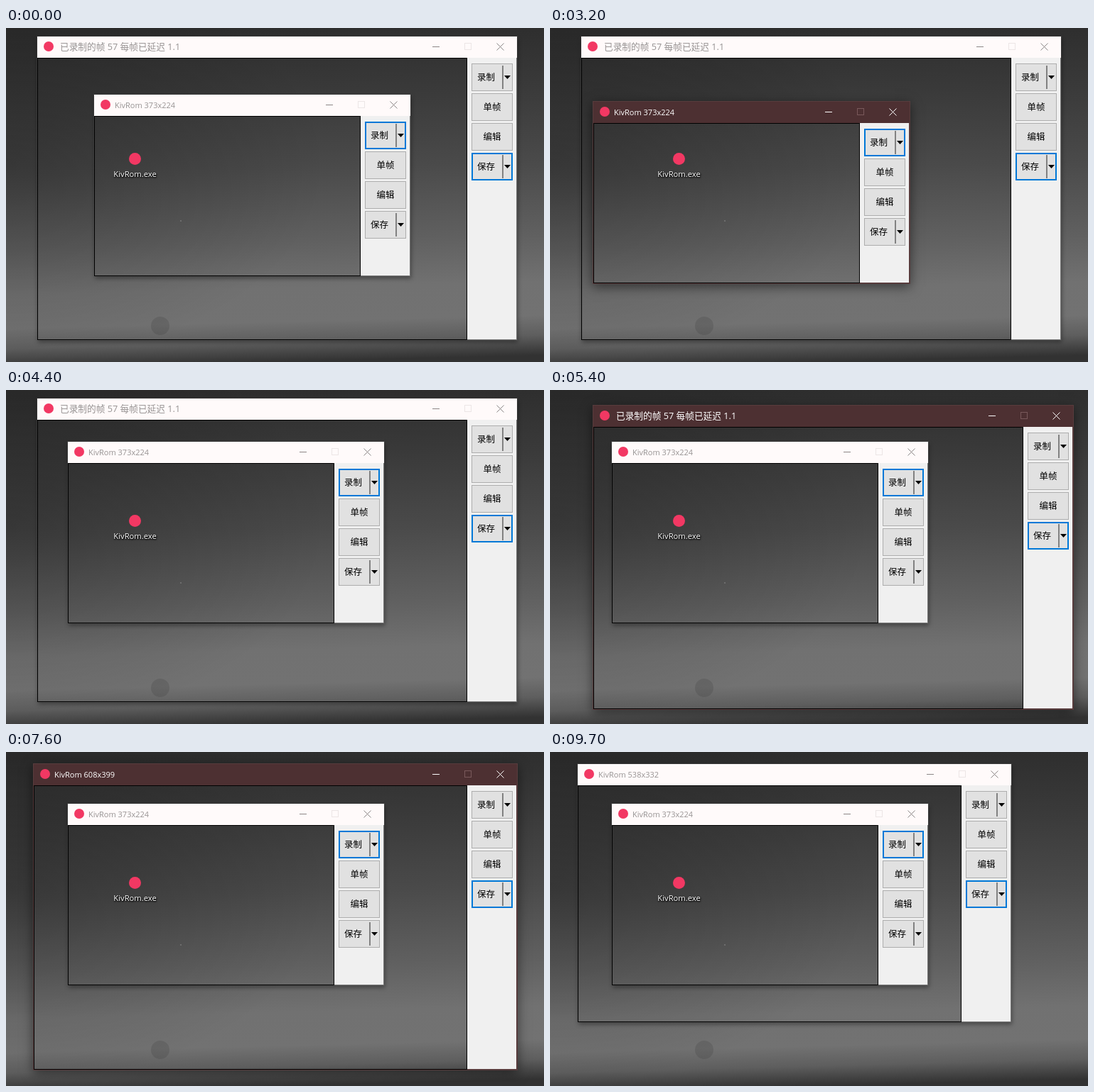
Write an HTML page that moves like this. It is 757x471 px and loops after 9800 ms.

```html
<!DOCTYPE html>
<html lang="zh-CN">
<head>
<meta charset="utf-8">
<title>Screen recorder windows</title>
<style>
html, body { margin: 0; width: 100%; height: 100%; overflow: hidden; background: #2c2c2c; }
#stage { position: absolute; left: 0; top: 0; width: 757px; height: 471px; overflow: hidden;
  font: 11px "Open Sans", "Noto Sans CJK SC", "Noto Sans CJK", sans-serif; }
#stage * { box-sizing: border-box; }
#stage div, #stage svg { position: absolute; }
.dot { border-radius: 50%; background: #f23863; }
.win { --edge: #787878; box-shadow: 0 0 0 1px rgba(90,90,90,.3), 1px 3px 6px rgba(0,0,0,.4); }
.win.active { --edge: #583c3d; box-shadow: 0 0 0 1px #583c3d, 0 4px 15px 1px rgba(0,0,0,.5); }
.bar { left: 0; right: 0; top: 0; height: 30px; background: #fffafa; color: #979393; }
.active .bar { background: #4d3032; color: #fff; }
.bar .dot { left: 9px; top: 7px; width: 14px; height: 14px; }
.title { left: 29px; top: 0; line-height: 30px; white-space: pre; }
.title.cjk { left: 32px; top: -1px; font-size: 12.7px; }
.controls { right: 0; top: 0; fill: none; stroke: #8c8686; }
.controls rect { stroke: #ece6e6; }
.active .controls { stroke: #fff; }
.active .controls rect { stroke: #79595b; }
.view { left: 0; top: 30px; right: 70px; bottom: 0; border: 1px solid #000; }
.panel { right: 0; top: 30px; width: 70px; bottom: 0; background: #f0f0f0;
  border: solid var(--edge); border-width: 0 1px 1px 0; }
.button { left: 6px; width: 58px; height: 39px; background: #e1e1e1; border: 1px solid #adadad; }
.button.focus { border: 2px solid #0078d7; }
.button.hover { background: #e5f1fb; border-color: #0078d7; }
.label { left: 6px; width: 58px; line-height: 39px; font-size: 12.5px; text-align: center; color: #000; }
.label.split { width: 41px; }
.panel svg { left: 6px; }
#glow { left: 144px; top: 173px; width: 76px; height: 42px; background: rgba(255,255,255,.13); border: 1px solid rgba(255,255,255,.22); }
#app { left: 173px; top: 176px; width: 17px; height: 17px; }
#name { left: 132px; top: 196px; width: 99px; line-height: 19px; text-align: center; font-size: 11.2px; color: #fff;
  text-shadow: 1px 1px 2px #000, 0 1px 2px #000; }
</style>
</head>
<body>
<div id="stage">
  <svg width="757" height="471">
    <defs>
      <linearGradient id="sky" gradientUnits="userSpaceOnUse" x1="360" y1="0" x2="372" y2="471">
        <stop offset="0" stop-color="#2d2d2d"/>
        <stop offset=".2" stop-color="#3a3a3a"/>
        <stop offset=".42" stop-color="#4a4a4a"/>
        <stop offset=".64" stop-color="#606060"/>
        <stop offset=".78" stop-color="#717171"/>
        <stop offset=".88" stop-color="#727272"/>
        <stop offset=".94" stop-color="#5e5e5e"/>
        <stop offset="1" stop-color="#323232"/>
      </linearGradient>
      <radialGradient id="shade" cx="0" cy=".4" r=".6">
        <stop offset="0" stop-opacity=".24"/>
        <stop offset="1" stop-opacity="0"/>
      </radialGradient>
    </defs>
    <rect width="757" height="471" fill="url(#sky)"/>
    <rect width="757" height="471" fill="url(#shade)"/>
    <circle cx="217" cy="420" r="13" opacity=".1"/>
    <circle cx="246" cy="272" r="1" fill="#777"/>
  </svg>
  <div id="glow"></div>
  <div id="app" class="dot"></div>
  <div id="name">KivRom.exe</div>
</div>
<script>
const LOOP = 9800;
const STEP = 100;
const stage = document.getElementById('stage');
const glow = document.getElementById('glow');

// A drag eases a pair of values out to `to`; each axis has its own power.
const drag = (start, end, to, power = [1, 1]) => ({ start, end, to, power });

const innerDrags = [
  drag(1900, 2300, [104, 104], [1, 4]),
  drag(2900, 3200, [61, 104]),
  drag(3300, 3700, [188, 110]),
  drag(3700, 4300, [87, 73], [3.15, 2.4])
];
const outerDrags = [
  drag(5100, 5400, [61, 22]),
  drag(5400, 5500, [21, 18]),
  drag(5600, 5900, [39, 17])
];
const outerResizes = [
  drag(7500, 7600, [608, 399]),
  drag(7600, 7800, [633, 421]),
  drag(7800, 8600, [538, 332], [2, 2])
];

function follow(from, drags, t) {
  return drags.reduce((pair, { start, end, to, power }) => {
    const u = Math.min(1, Math.max(0, (t - start) / (end - start)));
    return pair.map((v, i) => v + (to[i] - v) * (1 - (1 - u) ** power[i]));
  }, from).map(Math.round);
}

const during = (t, from, to) => t >= from && t < to;

function buttonHtml(text, i, focus) {
  const top = 8 + 42 * i;
  const split = i === 0 || i === 3;
  const drop = `<svg width="58" height="39" style="top:${top}px">
    <path d="M44 3V36" stroke="#6a6a6a" stroke-width="1.6"/><path d="M46 17h9l-4.5 5z"/></svg>`;
  return `<div class="button ${i === focus ? 'focus' : ''}" style="top:${top}px"></div>
    <div class="label ${split ? 'split' : ''}" style="top:${top}px">${text}</div>${split ? drop : ''}`;
}

function createWindow(focus) {
  const el = document.createElement('div');
  el.className = 'win';
  el.innerHTML = `<div class="bar"><div class="dot"></div><div class="title"></div>
    <svg class="controls" width="138" height="30">
      <path d="M19 14.5h10"/><rect x="64.5" y="9.5" width="9" height="9"/>
      <path d="M109.5 9.5l10 10M119.5 9.5l-10 10"/>
    </svg></div>
    <div class="view"></div>
    <div class="panel">${['录制', '单帧', '编辑', '保存'].map((s, i) => buttonHtml(s, i, focus)).join('')}</div>`;
  stage.append(el);
  return { el, title: el.querySelector('.title'), record: el.querySelector('.button') };
}

function updateWindow(win, [x, y], [w, h], active, status) {
  Object.assign(win.el.style, {
    left: x + 'px', top: y + 'px', width: w + 72 + 'px', height: h + 32 + 'px'
  });
  win.el.classList.toggle('active', active);
  win.title.classList.toggle('cjk', !!status);
  win.title.textContent = status || `KivRom ${w}x${h}`;
}

const outer = createWindow(3);
const inner = createWindow(0);

function render(time) {
  const t = Math.floor(time / STEP) * STEP;
  const status = t < 7600 ? '已录制的帧 57 每帧已延迟 1.1' : '';
  const outerSize = follow([603, 396], outerResizes, t);
  updateWindow(outer, follow([44, 12], outerDrags, t), outerSize, during(t, 5100, 9700), status);
  updateWindow(inner, follow([124, 94], innerDrags, t), [373, 224], during(t, 1800, 4400));
  outer.record.classList.toggle('hover', during(t, 300, 400));
  glow.style.visibility = during(t, 900, 1400) ? 'visible' : 'hidden';
}

const start = performance.now();
function tick() {
  render((performance.now() - start) % LOOP);
  requestAnimationFrame(tick);
}
tick();
</script>
</body>
</html>
```
